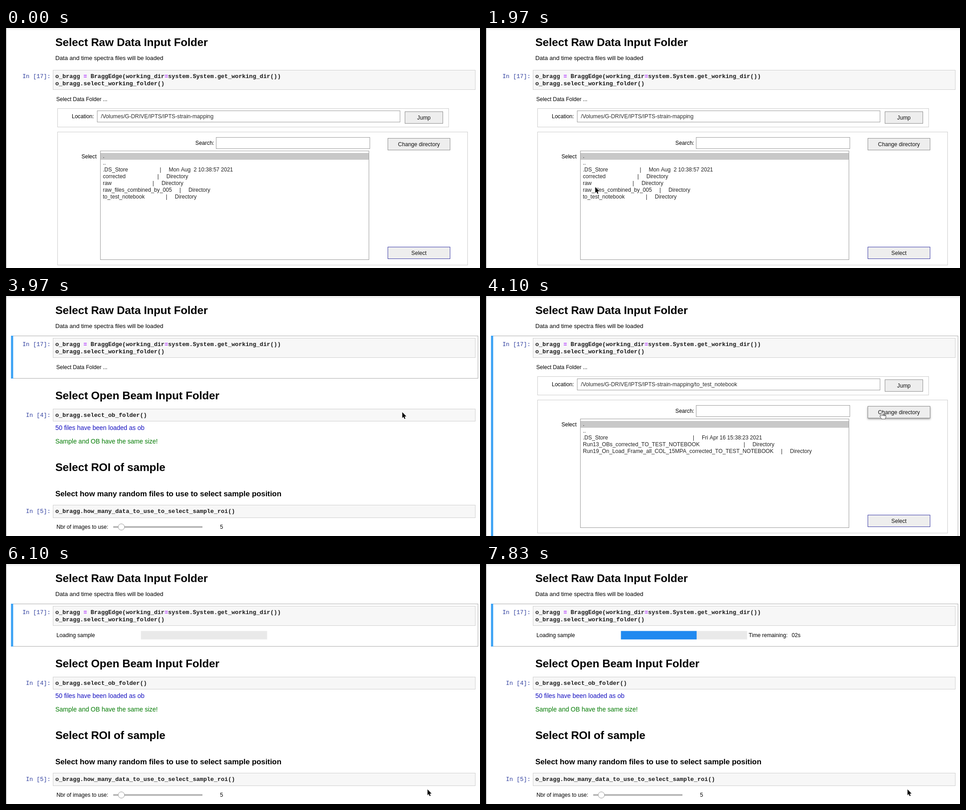
These frames come from a looping animation (1052x532 px, 8000 ms). An HTML page with a canvas:

```html
<!DOCTYPE html>
<html lang="en">
<head>
<meta charset="utf-8">
<title>Notebook folder selection</title>
<style>
  html, body { margin: 0; width: 100%; height: 100%; overflow: hidden; background: #fff; }
  canvas { display: block; }
</style>
</head>
<body>
<canvas id="stage" width="1052" height="532"></canvas>
<script>
const ctx = document.getElementById('stage').getContext('2d');
const LOOP = 8000;
const SANS = '"Liberation Sans", Arial, sans-serif';
const MONO = '"Liberation Mono", Courier, monospace';
const SMALL = `12.1px ${SANS}`, FIELD = `12.2px ${SANS}`, BODY = `13.2px ${SANS}`, NOTE = `14px ${SANS}`;
const H2 = `bold 24.55px ${SANS}`, H3 = `bold 16.85px ${SANS}`;
const CODE = `bold 13.04px ${MONO}`, PROMPT = `13.04px ${MONO}`;
const CHAR = 7.825;

// Times below are ticks of 1/15 s.
const T = { click: 45, press: 58, reload: 60, opened: 61, pick: 79, load: 90, firstFile: 95 };

// Pointer path: tick, x, y.
const PATH = [
  [8, 130, 27], [15, 742, 331], [19, 742, 331], [24, 957, 212], [30, 242, 352],
  [36, 242, 352], [42, 268, 376], [45, 268, 376], [50, 777, 273], [54, 879, 257],
  [64, 879, 257], [67, 790, 196], [72, 229, 400], [74, 290, 495], [77, 335, 340],
  [80, 335, 340], [87, 935, 499]
];

const JUMP = [885, 185, 85, 27], CHANGE = [847, 244, 139, 27], SELECT = [847, 485, 139, 27];

const DIR = 'Directory';
const ROOT = [
  ['.'], ['..'], ['.DS_Store', 'Mon Aug  2 10:38:57 2021'], ['corrected', DIR], ['raw', DIR],
  ['raw_files_combined_by_005', DIR], ['to_test_notebook', DIR]
];
const SUB = [
  ['.'], ['..'], ['.DS_Store', 'Fri Apr 16 15:38:23 2021'],
  ['Run13_OBs_corrected_TO_TEST_NOTEBOOK', DIR],
  ['Run19_On_Load_Frame_all_COL_15MPA_corrected_TO_TEST_NOTEBOOK', DIR]
];

function text(str, x, y, font = SMALL, color = '#000', align = 'left') {
  ctx.font = font;
  ctx.fillStyle = color;
  ctx.textAlign = align;
  ctx.fillText(str, x, y);
}

function fill(x, y, w, h, color) {
  ctx.fillStyle = color;
  ctx.fillRect(x, y, w, h);
}

function box(x, y, w, h, stroke, color) {
  if (color) fill(x, y, w, h, color);
  ctx.lineWidth = 1;
  ctx.strokeStyle = stroke;
  ctx.strokeRect(x + .5, y + .5, w - 1, h - 1);
}

function codeCell(y, h, prompt, lines) {
  box(104, y, 938, h, '#cfcfcf', '#f7f7f7');
  text(prompt, 99, y + 18.3, PROMPT, '#303f9f', 'right');
  lines.forEach((line, i) => text(line, 109.5, y + 18.3 + i * 16, CODE, '#1a1a1a'));
}

function button(rect, label, hover, border = '#8c8c8c') {
  const [x, y, w, h] = rect;
  ctx.save();
  if (hover) {
    ctx.shadowColor = 'rgba(0,0,0,.4)';
    ctx.shadowBlur = 4;
    ctx.shadowOffsetY = 2;
  }
  fill(x, y, w, h, '#eee');
  ctx.restore();
  box(x, y, w, h, border);
  text(label, x + w / 2, y + h / 2 + 4.6, FIELD, '#111', 'center');
}

function page(selected, bottom) {
  fill(0, 0, 1052, 532, '#fff');
  const shade = ctx.createLinearGradient(0, 0, 0, 6);
  shade.addColorStop(0, '#e9e9e9');
  shade.addColorStop(1, '#fff');
  fill(0, 0, 1052, 6, shade);
  fill(0, 0, 1, 532, '#999');
  text('Select Raw Data Input Folder', 109.5, 40, H2);
  text('Data and time spectra files will be loaded', 109.5, 71, BODY);
  if (selected) {
    box(11, 88, 1037, bottom - 88, '#ababab');
    fill(11, 88, 5, bottom - 88, '#42a5f5');
  }
  codeCell(93, 44, 'In [17]:', [
    'o_bragg   BraggEdge(working_dir system.System.get_working_dir())',
    'o_bragg.select_working_folder()'
  ]);
  for (const col of [8, 31]) text('=', 109.5 + col * CHAR, 111.3, CODE, '#aa22ff');
}

function chooser(tick, hover) {
  const opened = tick >= T.opened;
  const rows = opened ? SUB : ROOT;
  const focus = opened ? tick >= T.pick : tick >= T.click && tick < T.press;
  const chosen = opened ? (focus ? 4 : 0) : (tick >= T.click ? 6 : 0);

  box(114, 178, 869, 42, '#ccc');
  text('Location:', 195, 200, SMALL, '#000', 'right');
  box(202, 183, 673, 26, '#999');
  text('/Volumes/G-DRIVE/IPTS/IPTS-strain-mapping' + (opened ? '/to_test_notebook' : ''),
    210.5, 199.7, FIELD, '#2b2b2b');
  button(JUMP, 'Jump', hover === JUMP);

  box(114, 230, 911, 296, '#ccc');
  text('Search:', 462, 258.5, SMALL, '#000', 'right');
  box(466, 242, 342, 26, '#999');
  button(CHANGE, 'Change directory', hover === CHANGE);
  button(SELECT, 'Select', hover === SELECT, '#3a3aa6');

  text('Select', 201, 288.5, SMALL, '#000', 'right');
  box(209, 272, 597, 242, focus ? '#66b5e8' : '#999');
  const width = Math.max(...rows.map(row => row[0].length));
  rows.forEach(([name, info], i) => {
    const y = 277 + i * 14.9;
    if (i === chosen) fill(210, y, 595, 15, focus ? '#a8d0fa' : '#c8c8c8');
    const line = info ? name.padEnd(width) + '     |     ' + info : name;
    text(line, 215, y + 11.4, SMALL, i === chosen && focus ? '#000' : '#222');
  });
}

function lowerCells() {
  text('Select Open Beam Input Folder', 109.5, 228.5, H2);
  codeCell(250, 28, 'In [4]:', ['o_bragg.select_ob_folder()']);
  text('50 files have been loaded as ob', 109.5, 297, NOTE, '#1510c0');
  text('Sample and OB have the same size!', 109.5, 326.5, NOTE, '#007a00');
  text('Select ROI of sample', 109.5, 388, H2);
  text('Select how many random files to use to select sample position', 109.5, 444, H3);
  codeCell(463, 29, 'In [5]:', ['o_bragg.how_many_data_to_use_to_select_sample_roi()']);
  text('Nbr of images to use:', 112, 516);
  fill(238, 510, 198, 4, '#b9b9b9');
  ctx.beginPath();
  ctx.arc(256, 512, 7, 0, 7);
  ctx.fillStyle = '#fff';
  ctx.fill();
  ctx.strokeStyle = '#999';
  ctx.stroke();
  text('5', 475, 516);
}

function filesLoaded(tick) {
  if (tick < T.firstFile) return 0;
  if (tick <= 102) return tick - 94;
  if (tick <= 112) return Math.round(8 + (tick - 102) * 1.6);
  return Math.round(24 + Math.max(0, tick - 113) * 1.2);
}

function progress(tick) {
  text('Loading sample', 112, 161.5);
  fill(299.5, 148.5, 280, 18.7, '#e9e9e9');
  fill(299.5, 148.5, filesLoaded(tick) * 5.6, 18.7, '#2089f0');
  if (tick < T.firstFile) return;
  text('Time remaining:', 583, 161.5);
  text(tick < 108 ? '03s' : '02s', 678.5, 161.5);
}

function pointerAt(tick) {
  const i = PATH.findIndex(key => key[0] > tick);
  if (i < 0) return PATH[PATH.length - 1].slice(1);
  const [t0, x0, y0] = PATH[i - 1], [t1, x1, y1] = PATH[i];
  const k = (tick - t0) / (t1 - t0);
  return [x0 + (x1 - x0) * k, y0 + (y1 - y0) * k];
}

const ARROW = new Path2D('M.5 .5V13.5L3.3 10.8L5.3 15.4L7.4 14.5L5.5 10H9.5Z');
const HAND = new Path2D('M-1.5 1.2Q0-.8 1.5 1.2V6Q3 5 4 6.2Q5.6 5.4 6.4 6.8Q8 6.3 8.3 8V11.5L6.5 15.5H-.5L-4.5 10Q-4.6 7.8-2.7 8.6L-1.5 9.8Z');
const FINGERS = new Path2D('M1.5 6V8.5M4 6.2V8.7M6.4 6.8V9');

function pointer(x, y, hand) {
  ctx.save();
  ctx.translate(x, y);
  ctx.lineJoin = 'round';
  ctx.lineWidth = 1.2;
  ctx.strokeStyle = hand ? '#000' : '#fff';
  ctx.fillStyle = hand ? '#fff' : '#000';
  const shape = hand ? HAND : ARROW;
  ctx.stroke(shape);
  ctx.fill(shape);
  if (hand) ctx.stroke(FINGERS);
  ctx.restore();
}

function draw(ms) {
  const tick = Math.floor(ms * .015 + .56);
  const collapsed = tick >= T.load || tick === T.reload;
  const visible = tick >= PATH[0][0];
  const [px, py] = visible ? pointerAt(tick) : [-50, -50];
  const hover = !collapsed && [JUMP, CHANGE, SELECT].find(([x, y, w, h]) =>
    px > x && px < x + w && py > y && py < y + h);

  page(tick >= T.click, collapsed ? 183 : 560);
  if (tick < T.load) text('Select Data Folder ...', 111.5, 161.5);
  else progress(tick);
  if (collapsed) lowerCells();
  else chooser(tick, hover);
  if (visible) pointer(px, py, hover);
}

function loop() {
  draw(performance.now() % LOOP);
  requestAnimationFrame(loop);
}
loop();
</script>
</body>
</html>
```
